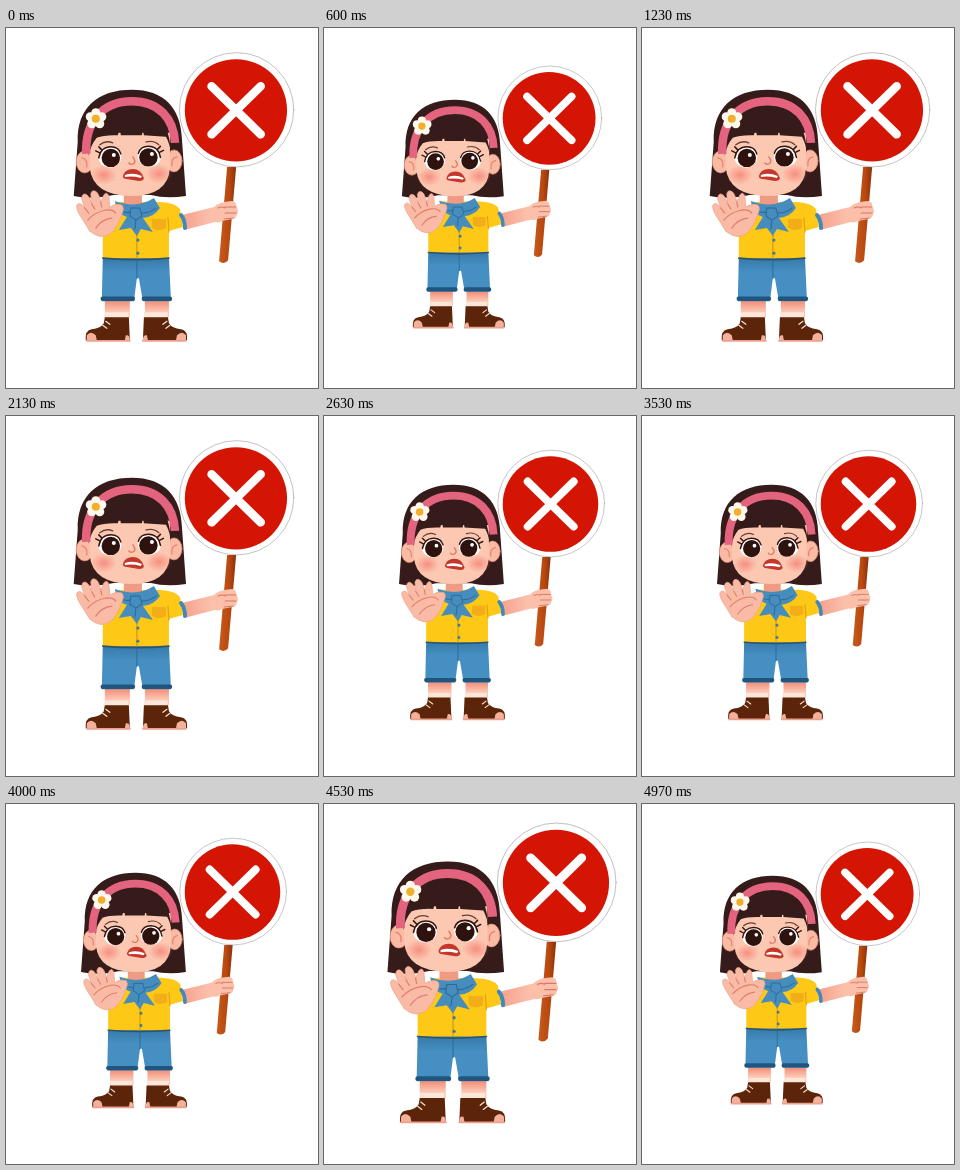
Animation of 312x360 px, one loop 5010 ms. Source, as an HTML page:

```html
<!DOCTYPE html>
<html lang="en">
<head>
<meta charset="utf-8">
<title>Stop sign girl</title>
<style>
html, body { margin: 0; width: 100%; height: 100%; overflow: hidden; background: #fff }
svg { display: block; width: 312px; height: 360px }
</style>
</head>
<body>
<svg viewBox="0 0 312 360" fill="none" stroke-linecap="round" stroke-linejoin="round">
<defs>
  <radialGradient id="blush"><stop stop-color="#f4776b" stop-opacity=".7"/><stop offset="1" stop-color="#f4776b" stop-opacity="0"/></radialGradient>
  <linearGradient id="leg" x2="0" y2="1"><stop stop-color="#f0836f"/><stop offset=".65" stop-color="#fcc5b0"/></linearGradient>
  <linearGradient id="arm"><stop stop-color="#f6a08c"/><stop offset=".5" stop-color="#fbbfaa"/></linearGradient>
  <linearGradient id="wood"><stop stop-color="#c65a1c"/><stop offset=".6" stop-color="#b9480f"/><stop offset="1" stop-color="#8a300a"/></linearGradient>
  <linearGradient id="denim" x2="0" y2="1"><stop stop-color="#3579a8"/><stop offset=".35" stop-color="#468fc2"/></linearGradient>
  <g id="eye">
    <ellipse rx="11.500" ry="10.500" fill="#fff"/>
    <circle cx="1" cy="1" r="9.200" fill="#2d120d"/>
    <path d="M-11 1Q-9-10 1-10Q9-10 11-3M-10-4l-4-2M-8-7l-3-3" stroke="#35150e" stroke-width="1.500"/>
  </g>
  <g id="shoe">
    <path d="M99 284h24l-1 10h-22z" fill="#fbe6da"/>
    <path d="M99 289H123L124 312H80Q79 302 86 301Q95 300 98 295Z" fill="#5c2509"/>
    <path d="M81 307q4-5 9 0l1 5H81zM120 307q4-1 4 5h-5z" fill="#f3b09b"/>
    <path d="M81 312.500h43" stroke="#eca090" stroke-width="1.800"/>
    <path d="M97 297l4 3M100 293l4 3" stroke="#f9e3d5" stroke-width="1.200"/>
  </g>
</defs>
<g id="figure">
  <!-- legs and shoes -->
  <path d="M99 271h25v18H99zM139 271h24v18h-24z" fill="url(#leg)"/>
  <use href="#shoe"/>
  <use href="#shoe" transform="matrix(-1 0 0 1 261 0)"/>

  <!-- shorts -->
  <path d="M97 229h66l2 44h-28l-4-23h-2l-3 23H96z" fill="url(#denim)"/>
  <path d="M97 270.500h30M138 270.500h26" stroke="#20567e" stroke-width="4.500"/>
  <path d="M131 232v18" stroke="#2d6c9a"/>

  <!-- sign -->
  <path d="M221 139h9l-8 93q-4 5-9 1z" fill="url(#wood)"/>
  <circle cx="230.500" cy="82" r="57" fill="#fff" stroke="#999" stroke-width=".6"/>
  <circle cx="229.800" cy="82.500" r="51" fill="#d51503"/>
  <path d="M205.500 58.500l49 48M254.500 58.500l-49 48" stroke="#fff" stroke-width="8.500"/>

  <!-- holding arm -->
  <path d="M176 187L208 179Q212 174 226 173Q231 174 230 179Q233 182 231 186Q230 191 226 191L216 193Q212 195 209 194L178 202Z" fill="url(#arm)"/>
  <path d="M219 179h11M219 185h11M218 191l9-1M212 180q4-2 7 0" stroke="#d87866"/>

  <!-- shirt -->
  <path d="M112 174H154Q170 175 174 181L177 199L163 203V230H97V206L104 182Z" fill="#fdc916"/>
  <path d="M162 190l1 14" stroke="#e0a012" stroke-width="1.200"/>
  <path d="M175 187q4 5 4 13" stroke="#4089b8" stroke-width="4"/>
  <path d="M97 230q33 3 66 0" stroke="#31536a" stroke-width="1.600"/>
  <path d="M131 201v29" stroke="#c9901a"/>
  <path d="M146 191h14v9q-7 4-14 0z" fill="#f3ad18"/>
  <g fill="#467b96"><circle cx="132" cy="212" r="1.600"/><circle cx="132" cy="225" r="1.600"/></g>

  <!-- hair and head -->
  <path d="M68 168L72 114C71 80 92 62 126 62C158 62 175 80 176 112L180 168Q160 171 145 167H108Q85 172 68 168Z" fill="#351c1a"/>
  <path d="M118 163h18v13q-9 5-18 0z" fill="#ef9a82"/>
  <g fill="#fabba4" stroke="#e88c77" stroke-width=".7">
    <ellipse cx="79" cy="134" rx="8.500" ry="11"/><ellipse cx="168" cy="133" rx="8" ry="11"/>
  </g>
  <path d="M76 130q6 1 5 9M171 129q-6 1-5 9" stroke="#e98371" stroke-width="1.300"/>
  <path d="M84 105H164V140Q162 168 125 168Q87 167 84 140Z" fill="#fcc8b2"/>
  <ellipse cx="98" cy="147" rx="13" ry="10" fill="url(#blush)"/>
  <ellipse cx="153" cy="146" rx="13" ry="10" fill="url(#blush)"/>
  <path d="M83 128Q80 78 125 78Q163 78 165 126Q164 116 160 109L138 107.500 137 101 136 107.500 115 107.500 114 101 112 107.500Q98 107 91 110Q85 117 83 128Z" fill="#351c1a"/>
  <path d="M80.500 126C79 94 97 73.500 126 73.500C153 73.500 168 91 169 115" stroke="#e4647f" stroke-width="8.500" stroke-linecap="butt"/>
  <use href="#eye" x="104" y="129"/>
  <use href="#eye" transform="matrix(-1 0 0 1 143.500 128.500)"/>
  <g fill="#fff"><circle cx="108" cy="127" r="2"/><circle cx="146" cy="126" r="2"/></g>
  <path d="M94 117q6-5 13-2M140 114q8-2 13 3" stroke="#654037" stroke-width="1.300"/>
  <path d="M127 129q4 5 0 7q-3 1-4-1" stroke="#df7862" stroke-width="1.400"/>
  <path d="M117 148Q119 141 127 141Q135 141 138 150Q138 153 133 153L121 151Q117 151 117 148Z" fill="#c5362b"/>
  <path d="M119 147Q127 144 136 148L135 150Q127 148 119 149Z" fill="#fff"/>
  <g fill="#fff8ec">
    <circle cx="90" cy="85" r="4.500"/><circle cx="96" cy="89" r="4.500"/><circle cx="94" cy="96" r="4.500"/>
    <circle cx="86" cy="96" r="4.500"/><circle cx="84.500" cy="89" r="4.500"/>
  </g>
  <circle cx="90" cy="91" r="4" fill="#f3ae2c"/>

  <!-- scarf -->
  <path d="M109 173Q131 181 148 170L154 180Q148 189 137 190L147 204 135 201 131 208 125 200 113 202 121 189Q111 186 109 173Z" fill="#468cbc"/>
  <path d="M125 180h9l2 8-6 4-6-4zM130 192l-1 9M112 180q7 6 12 4M136 185q8 0 14-5" stroke="#286a97"/>

  <!-- raised hand -->
  <path d="M84 203L74 187Q69 178 72 176Q75 174 79 180L76 171Q76 166 79 166Q83 166 86 176L85 166Q86 162 89 163Q93 164 95 174L98 167Q101 163 103 168L104 179Q110 175 116 177Q119 180 116 186Q112 199 104 206Q94 212 84 203Z" fill="#f9bba5" stroke="#eda18d" stroke-width=".7"/>
  <path d="M82 192q7-8 18-10q7-1 10 3M90 200q6-9 16-10M79 180l4 5M86 176l3 5M95 174l1 5" stroke="#df7f69" stroke-width="1.200"/>
</g>
</svg>
<script>
const LOOP = 5010, FRAMES = 150, CYCLE = 27, PEAK = 5, RISE = 9;
const figure = document.getElementById('figure');

// A cosine swell lasting two thirds of each cycle, then a rest at the small size.
function scaleAt(ms) {
  const frame = Math.min(FRAMES - 1, Math.floor((ms + 5) * 0.03));
  const raw = Math.abs(frame % CYCLE - PEAK);
  const distance = Math.min(raw, CYCLE - raw, RISE);
  return 1.022 + 0.112 * Math.cos(Math.PI * distance / RISE);
}

const start = performance.now();
function draw() {
  const s = scaleAt((performance.now() - start) % LOOP);
  figure.setAttribute('transform', `translate(178 169.5) scale(${s}) translate(-178 -169.5)`);
  requestAnimationFrame(draw);
}
draw();
</script>
</body>
</html>
```
